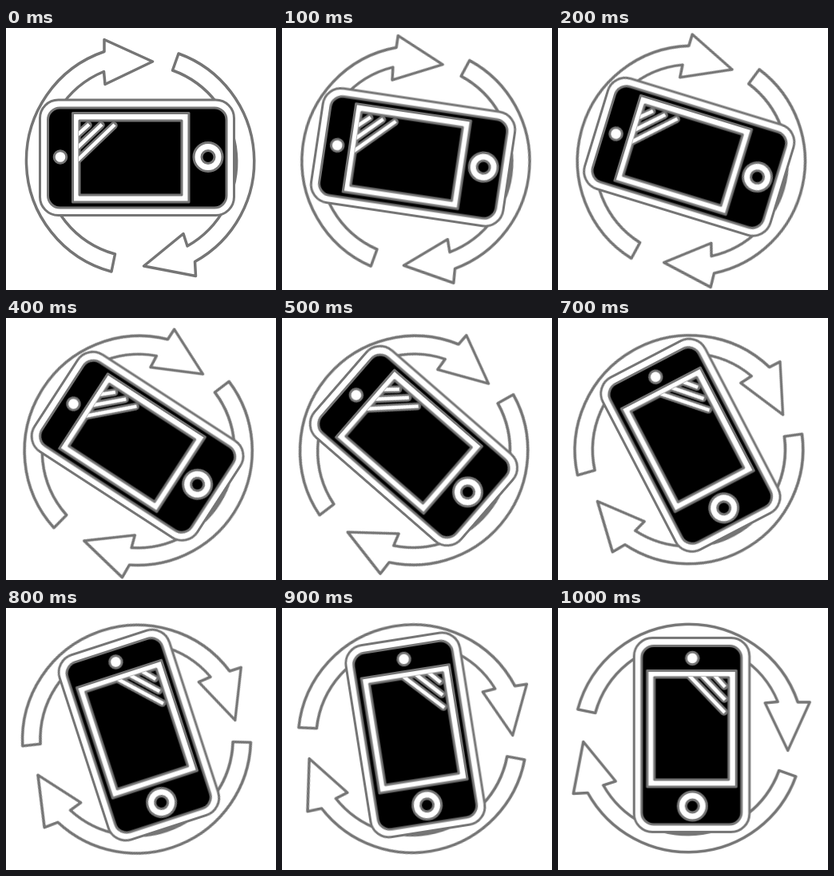
These frames come from a looping animation (338x328 px, 1.7 s). An HTML page without scripts:

```html
<!DOCTYPE html>
<html lang="en">
<head>
<meta charset="utf-8">
<title>Rotate device</title>
<style>
  html, body { margin: 0; width: 100%; height: 100%; overflow: hidden; background: #fff; }
  svg { display: block; width: 100vw; height: 100vh; }
  .edge { stroke: #757575; stroke-width: 3; stroke-linejoin: round; }
  .arrows { stroke-width: 3.5; }
  .white { fill: #fff; }
  .black { fill: #000; }
  .glare { fill: none; stroke: #757575; stroke-width: 9.5; }
  .shine { stroke: #fff; stroke-width: 4.5; }
  #device {
    transform-origin: 167.4px 162.3px;
    animation: turn 1.7s step-end infinite;
  }
  /* one pose every 100 ms, then a rest upright */
  @keyframes turn {
    0% { transform: rotate(0deg); }
    5.88% { transform: rotate(8.5deg); }
    11.76% { transform: rotate(17deg); }
    17.64% { transform: rotate(25deg); }
    23.52% { transform: rotate(33deg); }
    29.41% { transform: rotate(41deg); }
    35.29% { transform: rotate(53deg); }
    41.17% { transform: rotate(62.5deg); }
    47.05% { transform: rotate(72deg); }
    52.94% { transform: rotate(81deg); }
    58.82%, 100% { transform: rotate(90deg); }
  }
</style>
</head>
<body>
<svg viewBox="0 0 338 328">
  <defs>
    <clipPath id="screen"><rect x="91" y="115" width="130" height="95"/></clipPath>
  </defs>
  <g id="device">
    <g class="edge arrows white">
      <path d="M132 305A144.1 144.1 0 0 1 123 29.5L123 14.5L183.5 42L124 70.5L122.5 54.5A121 121 0 0 0 136.5 283Z"/>
      <path d="M216 32A143.4 143.4 0 0 1 236.500 292.5L237.500 310.5L172.500 298L222 257.500L227 273A121.5 121.5 0 0 0 208.500 53Z"/>
    </g>
    <path fill="#757575" d="M282 126A122.5 122.5 0 0 1 282 207Z"/>

    <rect class="edge white" x="42.5" y="90" width="243" height="144.5" rx="23"/>
    <rect class="edge black" x="52.5" y="100" width="223.5" height="125" rx="15"/>
    <rect class="edge white" x="83.5" y="106.5" width="145.5" height="111.5"/>
    <rect class="edge black" x="92" y="116" width="128" height="93"/>
    <g clip-path="url(#screen)" class="glare">
      <path stroke-linecap="round" d="M88 135L103 121.500M88 151L119 121.500M88 167L135 122"/>
      <path class="shine" d="M88 135L104 120.600M88 151L120 120.600M88 167L136 121"/>
    </g>

    <circle class="edge white" cx="68" cy="161.5" r="7.8"/>
    <circle class="edge white" cx="253" cy="161.5" r="18"/>
    <circle class="edge black" cx="253" cy="161.5" r="8"/>
  </g>
</svg>
</body>
</html>
```
